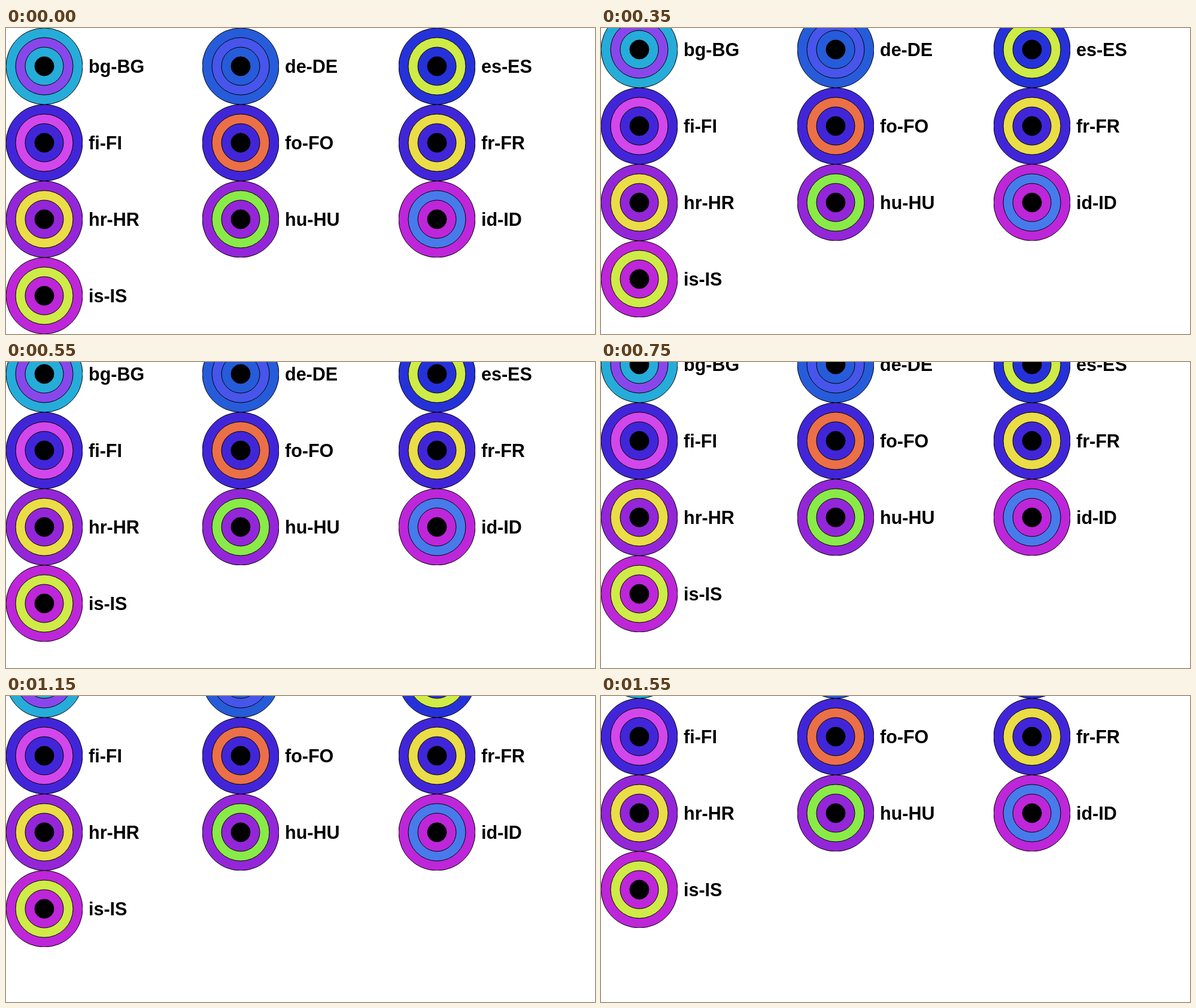
These frames come from a looping animation (984 by 512 pixels, 1600 ms). An HTML page:

```html
<!DOCTYPE html>
<html lang="en">
<head>
<meta charset="utf-8">
<title>Locale rings</title>
<style>
  html, body { margin: 0; width: 100%; height: 100%; overflow: hidden; background: #fff; }
  #stage { position: relative; width: 984px; height: 512px; overflow: hidden; }
  #list { display: grid; grid-template-columns: repeat(3, 328px); grid-auto-rows: 128px; }
  .item { position: relative; }
  svg { display: block; width: 128px; height: 128px; overflow: hidden; }
  circle { stroke: #000; stroke-width: 1; }
  .label {
    position: absolute; left: 138px; top: 0;
    font: bold 30.5px/128px "Liberation Sans", Arial, sans-serif;
    color: #000; white-space: nowrap;
  }
</style>
</head>
<body>
<div id="stage"><div id="list"></div></div>
<script>
  // label, base hue, accent hue
  const locales = [
    ["bg-BG", 195, 264], ["de-DE", 222, 235], ["es-ES", 236, 70],
    ["fi-FI", 249, 291], ["fo-FO", 249, 15], ["fr-FR", 249, 55],
    ["hr-HR", 277, 55], ["hu-HU", 277, 96], ["id-ID", 291, 221],
    ["is-IS", 291, 70]
  ];
  const ROW = 128, STEPS = 32, LOOP = 1600;

  const ring = (r, fill) => `<circle cx="64" cy="64" r="${r}" fill="${fill}"/>`;

  function item([name, hue, accentHue]) {
    const base = `hsl(${hue}, 70%, 50%)`;
    const accent = `hsl(${accentHue}, 80%, 60%)`;
    const rings = ring(64, base) + ring(48, accent) + ring(32, base) + ring(16, "#000");
    return `<div class="item"><svg viewBox="0 0 128 128">${rings}</svg><span class="label">${name}</span></div>`;
  }

  const list = document.getElementById("list");
  list.innerHTML = locales.map(item).join("");

  // Scroll up by one row in even 4px steps
  list.animate(
    [{ transform: "translateY(0)" }, { transform: `translateY(${-ROW}px)` }],
    { duration: LOOP, iterations: Infinity, easing: `steps(${STEPS}, end)` }
  );
</script>
</body>
</html>
```
